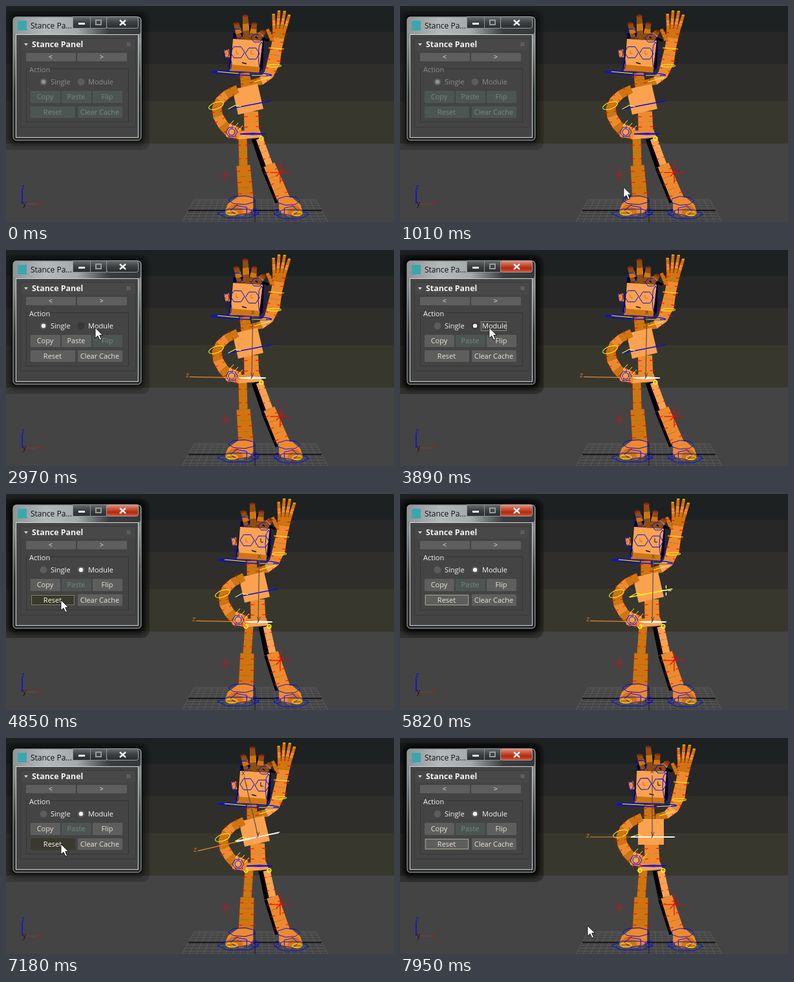
An HTML page for the animation above (7990 ms loop, 600x336 px).

```html
<!DOCTYPE html>
<html lang="en">
<head>
<meta charset="utf-8">
<style>
html, body { margin: 0; width: 100%; height: 100%; overflow: hidden; background: #444; }
svg { display: block; width: 600px; height: 336px; }
text { font-family: "Open Sans", "Noto Sans", sans-serif; }
</style>
</head>
<body>
<svg id="stage" viewBox="0 0 600 336" xmlns="http://www.w3.org/2000/svg"></svg>
<script>
const LOOP = 7990;
const LIGHT = '#fba251', MID = '#ee8a2e', DARK = '#cf7510', BROWN = '#8c4d12';
const BLUE = '#0808f0', YELLOW = '#ffff18', RED = '#e80808', WHITE = '#f4f4f4';

// ---- drawing helpers ----
const poly = (pts, fill) => `<polygon points="${pts}" fill="${fill}"/>`;
const line = (pts, color, w = 1, extra = '') =>
  `<polyline points="${pts}" fill="none" stroke="${color}" stroke-width="${w}" ${extra}/>`;
const rect = (x, y, w, h, fill, extra = '') =>
  `<rect x="${x}" y="${y}" width="${w}" height="${h}" fill="${fill}" ${extra}/>`;
const text = (x, y, s, fill, size = 11, extra = '') =>
  `<text x="${x}" y="${y}" fill="${fill}" font-size="${size}" ${extra}>${s}</text>`;
const group = (body, move, id = '') => `<g ${id && `id="${id}"`} transform="${move}">${body}</g>`;
const times = (n, fn) => Array.from({ length: n }, (_, i) => fn(i)).join('');
const mix = (a, b, k) => a + (b - a) * k;

// Closed outline: few sides give a hexagon, many an ellipse
function loop(x, y, rx, ry, color, sides = 20, turn = 0, w = 1) {
  const pts = times(sides + 1, i => {
    const a = i * 2 * Math.PI / sides;
    return `${rx * Math.cos(a)},${ry * Math.sin(a)} `;
  });
  return group(line(pts, color, w), `translate(${x} ${y}) rotate(${turn})`);
}

// Chain of n blocks along a bent path, tapering from w0 to w1, red ticks at the joints
function limb(from, via, to, w0, w1, n, fills, ticks = true) {
  const at = k => {
    const p = [0, 1].map(i => mix(mix(from[i], via[i], k), mix(via[i], to[i], k), k));
    const d = [0, 1].map(i => mix(via[i] - from[i], to[i] - via[i], k));
    const len = Math.hypot(...d), half = mix(w0, w1, k) / 2;
    return side => `${p[0] - d[1] / len * half * side},${p[1] + d[0] / len * half * side}`;
  };
  const blocks = times(n, i => {
    const a = at(i / n), b = at((i + 1) / n);
    return poly(`${a(1)} ${b(1)} ${b(-1)} ${a(-1)}`, fills[i % fills.length]);
  });
  const marks = times(ticks ? n : 0, i => {
    const p = at((i + 0.5) / n);
    return line(`${p(1.3)} ${p(0.5)}`, RED) + line(`${p(-1.3)} ${p(-0.6)}`, RED);
  });
  return blocks + marks;
}
const bar = (from, to, w0, w1, n, fills, ticks) =>
  limb(from, [(from[0] + to[0]) / 2, (from[1] + to[1]) / 2], to, w0, w1, n, fills, ticks);

// ---- scenery ----
function backdrop() {
  const tones = ['#1d2122', '#272727', '#2f2e2b', '#38372d', '#444'];
  let out = tones.map((c, i) => rect(0, i && 40 + 50 * (i - 1) + 4 * (i - 1) * (i - 2), 600, 336, c)).join('');
  out += times(21, i => line(`${291 + 9.4 * i},301 ${272 + 11.3 * i},336`, '#626262', 0.7));
  out += times(10, i => {
    const k = Math.pow(i / 9, 1.2);
    return line(`${291 - 19 * k},${301 + 35 * k} ${479 + 19 * k},${301 + 35 * k}`, '#626262', 0.7);
  });
  out += line('282,318 488,318', '#080808', 1.4) + line('385,301 385,336', '#111');
  out += line('25,286 25,308', BLUE, 1.5) + line('25,308 48,308', '#8c3a2c', 1.2);
  return out + text(24, 285, 'z', BLUE, 10) + text(26, 311, 'y', '#111', 10) + text(50, 309, 'x', RED, 9);
}

// ---- figure ----
function head(turned) {
  let out = poly('352,42 399,49 397,98 389,104 345,97', '#000') + poly('358,41 390,41 396,54 358,51', BROWN);
  out += times(4, i => {
    const x = 363 + 9 * i, tip = [x + 5 * i - 7, 28 + 12 * Math.abs(i - 1) - 12];
    return bar([x, 50], tip, 12, 8, 3, [BROWN, DARK], false) +
      bar([x + 6, 50], [tip[0] + 8, tip[1] + 14], 4, 4, 1, ['#000'], false) +
      loop(...tip, 4, 2, BROWN) + line(`${tip[0] - 3},${tip[1]} ${tip[0] + 3},${tip[1]}`, RED, 1.4);
  });
  out += bar([341, 68], [343, 80], 8, 7, 1, [MID]) + loop(341, 74, 4, 6, BLUE);
  out += poly('351,51 397,54 391,104 347,98', LIGHT) + poly('347,91 393,95 391,105 346,102', DARK);
  out += loop(358, 43, 9, 8, BLUE, 6) + loop(388, 50, 9, 7, BLUE, 6) + loop(395, 78, 5, 22, BLUE, 8) + loop(346, 90, 3, 9, BLUE, 6);
  const glasses = times(2, i => loop(358 + 23 * i, 72 + 2 * i, 11, 10, BLUE, 6) +
    line(`${356 + 23 * i},69 ${356 + 23 * i},${74 + i} ${360 + 23 * i},${74 + i}`, i && turned ? '#111' : DARK));
  out += group(glasses + line('365,88 372,90', '#111', 1.6), `translate(${turned * 4})`);
  return out + loop(364, 105, 47, 2.5, BLUE, 20, 3, 1.4) + line('327,102 360,105', YELLOW) + line('380,108 402,108', YELLOW);
}

function waveArm() {
  let out = limb([378, 120], [407, 120], [413, 90], 9, 19, 3, [DARK, LIGHT, MID]);
  out += bar([413, 92], [419, 61], 20, 17, 2, [MID]) + bar([419, 62], [423, 36], 17, 21, 2, [MID, DARK]);
  out += bar([412, 53], [404, 36], 7, 5, 2, [DARK]);
  out += times(4, i => {
    const a = (7 * i - 3) * Math.PI / 180, len = 32 - 2.6 * (i - 1.5) ** 2, x = 415 + 5 * i;
    const tip = [x + len * Math.sin(a), 39 - len * Math.cos(a)];
    return bar([x, 40], tip, 5.5, 4.5, 3, [DARK, MID]) + line(`${tip[0] - 2},${tip[1]} ${tip[0] + 2},${tip[1]}`, YELLOW);
  });
  return out + line('406,65 430,67', YELLOW) + loop(415, 93, 11, 2, YELLOW) + line('384,118 408,111', YELLOW);
}

function hipArm() {
  let out = limb([358, 129], [298, 153], [350, 200], 13, 17, 6, [DARK, MID, DARK]);
  out += bar([343, 193], [362, 199], 21, 17, 2, [LIGHT, MID]) + loop(349, 196, 9, 8, BLUE, 6) + loop(349, 196, 5, 5, BLUE);
  out += loop(325, 155, 12, 5, YELLOW, 20, -20);
  return out + times(3, i => line(`${345 + 7 * i},${186 + 4 * i} ${352 + 7 * i},${178 + 4 * i}`, YELLOW));
}

function foot(x, y, sx) {
  let out = poly('-21,4 -21,-18 3,-18 18,-7 22,4 16,11 -6,10', MID) + poly('22,4 12,-6 -4,0 -6,11 16,11', DARK);
  out += loop(-4, -13, 21, 7, BLUE, 7) + loop(2, 8, 32, 8, BLUE, 6) + loop(0, 3, 14, 8, BLUE, 5);
  out += loop(-24, 5, 6, 5, BLUE, 8) + loop(12, 7, 9, 3, YELLOW) + line('2,-6 9,-4', RED);
  return group(out, `translate(${x} ${y}) scale(${sx} 1)`);
}

// hip and chest are 1 once that joint has been reset
function figure(hip, chest, id) {
  const dx = 10 * hip, top = y => [[366 + dx, y], [392 + dx + hip, y]];
  const [hipL, hipR] = top(206), kneeL = [367 + 6 * hip, 248], kneeR = [407 + 5 * hip, 247];
  const lean = -13 * (1 - chest);
  let out = bar([hipR[0] - 6, 206], [kneeR[0] - 6, 250], 13, 13, 1, ['#000'], false);
  out += bar([kneeR[0] - 5, 250], [424, 304], 16, 16, 1, ['#000'], false);
  out += bar(hipR, kneeR, 11, 11, 2, [LIGHT]) + bar(kneeR, [430, 302], 18, 20, 3, [MID]);
  out += bar(hipL, kneeL, 13, 13, 2, [DARK]) + bar(kneeL, [371, 300], 21, 23, 3, [DARK]);
  out += foot(361, 315, -1) + foot(440, 316, 0.85);
  out += times(2, i => group(line('0,-14 0,14', RED) + line('-13,0 13,0', RED) + line('-5,5 5,-5', RED),
    `translate(${339 + 85 * i} ${264 - 5 * i}) scale(${0.7 + 0.5 * i})`));
  out += bar([379 + dx, 164], [380 + dx, 196], 22, 23, 2, [MID]);
  out += bar([376 + dx, 193], [377 + dx, 206], 32, 39, 2, [MID, LIGHT], false);
  out += times(1 + hip, i => loop(hip ? 371 + 36 * i : 395, 206, 3, 3, YELLOW, 8, 0, 1.6));
  out += group(waveArm(), `translate(${8 * hip + 9 * chest} ${3 * chest})`);
  out += bar([369 + 11 * hip + 5 * chest, 104], [372 + 9 * hip + 5 * chest, 126], 15, 17, 2, [DARK]);
  out += group(rect(-20, -20, 40, 40, LIGHT), `translate(${374 + 10 * hip + 4 * chest} ${145 + chest}) rotate(${lean})`);
  out += group(hipArm(), `translate(${10 * hip + 6 * chest} ${-6 * chest})`);
  out += group(head(hip), `translate(${11 * hip + 5 * chest} ${-chest}) rotate(${-2 * chest} 370 75)`);
  out += group(line('-34,0 34,0', BLUE, 1.5, `id="chest${id}"`) + line('-34,0 -22,-4 -14,0', YELLOW),
    `translate(${377 + 11 * hip + 3 * chest} 154) rotate(${lean * 0.85})`);
  out += group(line('-20,0 0,-1 20,0 0,1 -20,0', BLUE, 1.4, `id="hip${id}"`), `translate(${382 + dx} 199)`);
  return group(out, '', 'pose' + id);
}

function gizmo(id, x, y, turn, half) {
  const upright = (px, py, s, color) => group(text(-3, 3, s, color), `translate(${px} ${py}) rotate(${-turn})`);
  const out = line(`-96,0 ${-half},0`, '#e08a32', 1.2) + line(`${-half},0 ${half},0`, '#fff', 1.3) +
    line('0,0 0,-96', '#55504a', 1.2) + upright(-99, -2, 'z', '#d97a1e') +
    upright(0, -102, 'x', '#4a443e') + upright(1, -5, 'y', '#4a443e');
  return group(out, `translate(${x} ${y}) rotate(${turn})`, id);
}

// ---- panel ----
const row = (names, x, y, w, h, gap) =>
  names.map((name, i) => ({ name, id: 'b' + y + i, x: x + i * (w + gap), y, w, h }));
const buttons = [
  ...row(['&lt;', '&gt;'], 31, 73, 77, 13, 2),
  ...row(['Copy', 'Paste', 'Flip'], 38, 132, 46, 19, 2),
  ...row(['Reset', 'Clear Cache'], 38, 156, 69, 18, 4)
];
const radios = ['Single', 'Module'].map((name, i) => ({ name, id: 'r' + i, x: 58 + 58 * i }));

function gradient(id, colors, extra = 'x2="0" y2="1"') {
  const stops = colors.map((c, i) => `<stop offset="${i / (colors.length - 1)}" stop-color="${c}"/>`).join('');
  return `<linearGradient id="${id}" ${extra}>${stops}</linearGradient>`;
}

function panel() {
  let out = '<defs>' + gradient('glass', ['#777d7f', '#868b8d', '#5d6163', '#36393a', '#2b2d2e', '#2b2d2e']) +
    gradient('title', ['#8f9597', '#b4b9bb', '#a4a9ab', '#3a3e40', '#34383a'], '') +
    gradient('red', ['#e39a87', '#cb5a43', '#b02a12', '#d8583a']) + gradient('grey', ['#6a6f71', '#3c4042', '#2a2d2e']) +
    '<filter id="blur"><feGaussianBlur stdDeviation="4"/></filter></defs>';
  out += rect(-10, 8, 232, 216, '#0c0c08', 'id="halo" rx="12"');
  out += rect(5, 11, 210, 205, '#000', 'id="shade" rx="9" filter="url(#blur)"');
  out += rect(10, 16, 200, 194, 'url(#glass)', 'rx="6" stroke="#050505" stroke-width="2"');
  out += rect(12, 18, 196, 26, 'url(#title)', 'rx="4"') + rect(11, 17, 198, 192, 'none', 'rx="5" stroke="#aeb4b6"');
  out += rect(18, 23, 14, 15, '#3aa7ad') + text(38, 35, 'Stance Pa...', '#111', 12);
  out += times(2, i => rect(103.5 + 27 * i, 16.5, 27 - 2 * i, 18, 'url(#grey)', 'stroke="#8d9294"'));
  out += rect(155.5, 16.5, 49, 18, 'url(#grey)', 'id="close" rx="3" stroke="#9a9fa1"');
  out += rect(112, 26, 10, 3, WHITE) + rect(139, 22, 8, 7, 'none', 'stroke="#9a9a9a" stroke-width="2"');
  out += line('176,22 185,30', WHITE, 2.4) + line('185,22 176,30', WHITE, 2.4);
  out += rect(15.5, 44.5, 189, 160, '#444', 'stroke="#d4d8d8"') + rect(22.5, 50.5, 178, 138, '#444', 'stroke="#393939"');
  out += rect(23, 51, 177, 18, '#484848') + poly('28,58 34,58 31,62', '#d0d0d0');
  out += text(40, 64, 'Stance Panel', WHITE, 12.4, 'font-weight="700"');
  out += times(9, i => rect(187 + i % 3 * 2, 57 + Math.floor(i / 3) * 2, 1, 1, '#999'));
  out += rect(31.5, 97.5, 158, 83, 'none', 'stroke="#353535"') + rect(35, 92, 33, 12, '#444');
  out += text(36, 103, 'Action', WHITE, 11, 'id="action"');
  for (const { name, id, x } of radios)
    out += `<circle id="${id}Box" cx="${x}" cy="118" r="5.5"/><circle id="${id}Dot" cx="${x}" cy="118" r="3.2"/>` +
      text(x + 11, 122, name, WHITE, 11, `id="${id}Text"`);
  for (const { name, id, x, y, w, h } of buttons)
    out += rect(x, y, w, h, '', `id="${id}Box" rx="1.5"`) +
      text(x + w / 2 - 0.5, y + h / 2 + 3.5, name, '', 11, `id="${id}Text" text-anchor="middle"`);
  return out + rect(0, 0, 0, 0, 'none', 'id="focus" stroke="#d8d3aa" stroke-dasharray="1 1"');
}

const cursor = '<path id="arrow" d="M0 0V16L4 12.5 7 19 9.5 18 6.7 11.5H11.5Z" fill="#fff" stroke="#000" stroke-width=".8"/>' +
  '<path id="cross" d="M-8 0H-3M3 0H8M0-8V-3M0 3V8M-1 0H1" fill="none" stroke="#fff" stroke-width="1.3"/>';

const stage = document.getElementById('stage');
stage.innerHTML = backdrop() + figure(0, 0, 0) + figure(1, 0, 1) + figure(1, 1, 2) +
  gizmo('hipAxes0', 380, 199, 1, 20) + gizmo('hipAxes1', 390, 199, 1, 20) +
  gizmo('chestAxes1', 390, 154, -13, 34) + gizmo('chestAxes2', 390, 154, 0, 33) +
  panel() + group(cursor, '', 'cursor');

const el = {};
stage.querySelectorAll('[id]').forEach(n => el[n.id] = n);
const show = (id, on) => el[id].setAttribute('display', on ? 'inline' : 'none');
const set = (id, name, value) => el[id].setAttribute(name, value);

// ---- timeline ----
const PICK_HIP = 2010, PICK_MODULE = 3490, RESET_HIP = 4850, PICK_CHEST = 5940, RESET_CHEST = 7220;
const spots = {
  below: [300, 345], hip: [405, 201], module: [138, 121], reset: [85, 165],
  chest: [414, 150], clear: [166, 165], floor: [290, 292]
};
// Each move: start, end, destination
const moves = [
  [370, 1770, 'hip'], [2290, 2970, 'module'], [4290, 4690, 'reset'], [5100, 5860, 'chest'],
  [6140, 6540, 'clear'], [6540, 7000, 'reset'], [7630, 7950, 'floor']
];

function pointer(t) {
  let [x, y] = spots.below;
  for (const [from, to, name] of moves) {
    const k = Math.min(1, Math.max(0, (t - from) / (to - from))), e = k * k * (3 - 2 * k);
    x = mix(x, spots[name][0], e);
    y = mix(y, spots[name][1], e);
  }
  return [x, y];
}

function draw(t) {
  const [x, y] = pointer(t);
  const pose = (t >= RESET_HIP) + (t >= RESET_CHEST);
  const enabled = t >= PICK_HIP, module = t >= PICK_MODULE;
  const chestPicked = t >= PICK_CHEST, hipPicked = enabled && !chestPicked;
  const active = module && !chestPicked || t >= RESET_CHEST;
  const near = name => Math.hypot(x - spots[name][0], y - spots[name][1]) < 14;
  const inside = (bx, by, w, h) => x >= bx && x < bx + w && y >= by && y < by + h;
  const tint = (picked, hover) => picked ? '#fff' : hover ? YELLOW : BLUE;

  for (let i = 0; i < 3; i++) show('pose' + i, i === pose);
  set('hip' + pose, 'stroke', tint(hipPicked, near('hip')));
  set('chest' + pose, 'stroke', tint(chestPicked, near('chest')));
  for (const i of [0, 1]) show('hipAxes' + i, hipPicked && pose === i);
  for (const i of [1, 2]) show('chestAxes' + i, chestPicked && pose === i);

  set('close', 'fill', active ? 'url(#red)' : 'url(#grey)');
  set('halo', 'opacity', active ? 0.32 : 0.16);
  set('shade', 'opacity', active ? 0.9 : 0.5);
  set('action', 'fill', enabled ? WHITE : '#8b8b8b');
  radios.forEach(({ id, x: rx }, i) => {
    set(id + 'Box', 'fill', enabled && inside(rx - 6, 111, 55, 14) ? '#383832' : '#5c5c5c');
    set(id + 'Dot', 'fill', enabled ? WHITE : '#929292');
    show(id + 'Dot', module === (i === 1));
    set(id + 'Text', 'fill', enabled ? WHITE : '#8d8d8d');
  });
  for (const { name, id, x: bx, y: by, w, h } of buttons) {
    const on = by < 100 || enabled && name !== (module ? 'Paste' : 'Flip');
    const hover = on && inside(bx, by, w, h) && t < RESET_CHEST;
    set(id + 'Box', 'fill', !on ? '#4d5553' : hover ? '#3a392e' : '#5e5e5e');
    set(id + 'Text', 'fill', !on ? '#7d8481' : hover ? '#fffbe0' : '#e8e4d2');
  }
  show('focus', active);
  const box = t < RESET_HIP ? [125.5, 111.5, 39, 14] : [39.5, 157.5, 66, 15];
  ['x', 'y', 'width', 'height'].forEach((n, i) => set('focus', n, box[i]));

  const aiming = near('hip') || near('chest');
  set('cursor', 'transform', `translate(${x} ${y})`);
  show('cross', aiming);
  show('arrow', !aiming);
}

const start = performance.now();
function tick() {
  draw((performance.now() - start) % LOOP);
  requestAnimationFrame(tick);
}
draw(0);
requestAnimationFrame(tick);
</script>
</body>
</html>
```
